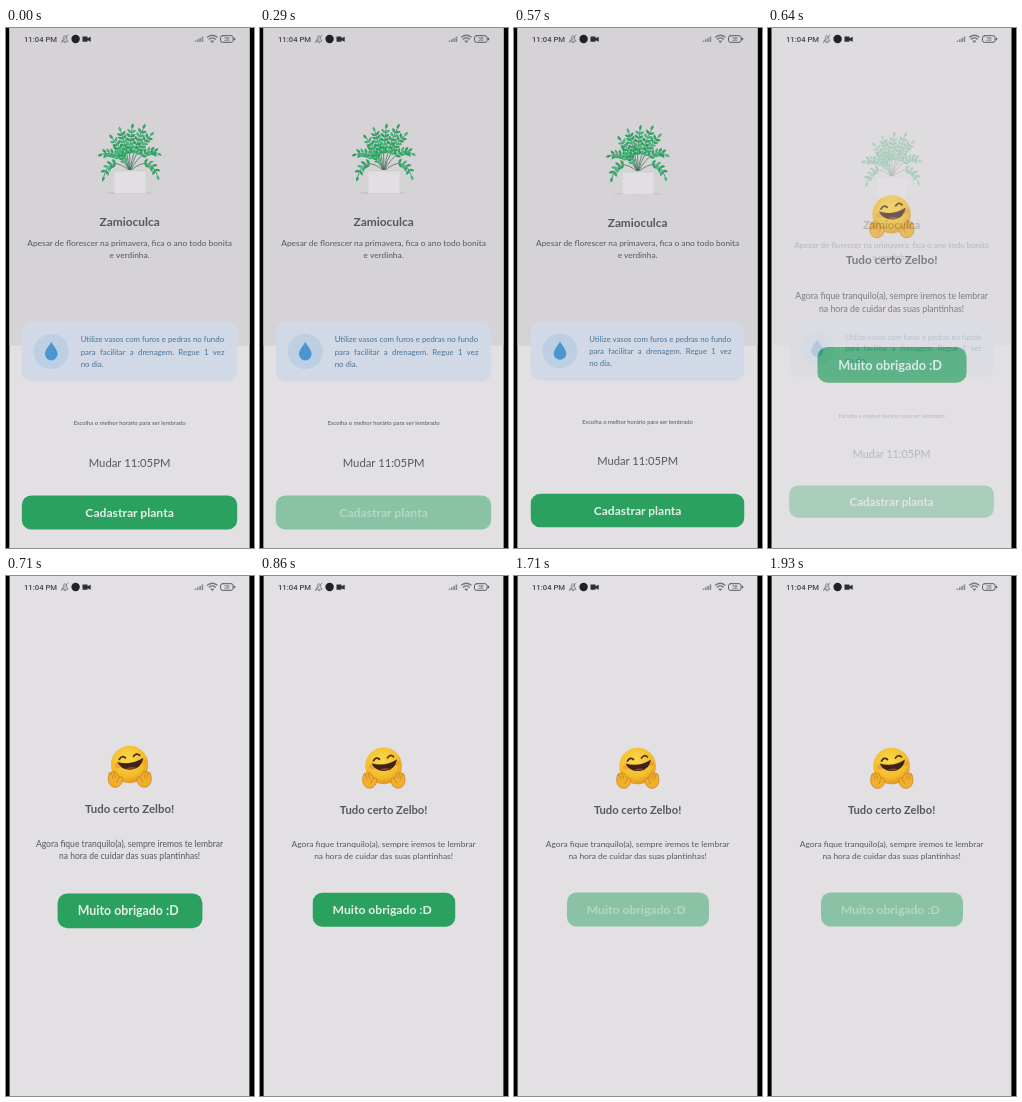
An HTML page for the animation above (2 s loop, 248 by 520 pixels).

```html
<!DOCTYPE html>
<html lang="pt-BR">
<head>
<meta charset="utf-8">
<title>Lembrete de planta</title>
<style>
  html, body { margin: 0; width: 100%; height: 100%; overflow: hidden; background: #000; }
  svg { display: block; width: 248px; height: 520px; }
  text { font-family: Lato, "Open Sans", sans-serif; fill: #55595d; }
  .mid { text-anchor: middle; }
  .bold { font-weight: 700; }
  .body { font-size: 8.4px; }
  .tip { font-size: 7.85px; fill: #4c7398; }
  .label { font-size: 12.15px; fill: #e6eee9; }
  .clock { font: 500 7.7px Roboto, sans-serif; fill: #454548; }
  .btn { fill: #2ba160; }
</style>
</head>
<body>
<svg viewBox="0 0 248 520">
  <defs>
    <radialGradient id="skin" cx=".45" cy=".35" r=".7">
      <stop offset="0" stop-color="#fbd94a"/>
      <stop offset=".65" stop-color="#f3bd2c"/>
      <stop offset="1" stop-color="#dc8f22"/>
    </radialGradient>
    <g id="hand" fill="#f0b02c" stroke="#c9791f" stroke-width=".7" stroke-linecap="round">
      <path d="M-6 -5 C-8 -1 -7 6 -2 7.5 C3 9 7 5 7 0 C7 -3 5 -3.5 4 -1.5 L1 -7 Q-.5 -8.5 -1.5 -7 Q-3 -9 -4 -6.8 Q-6 -7.5 -6 -5Z"/>
      <path d="M-4 -6.4 L-2.4 -1 M-1.5 -6.8 L.2 -1.6 M4 -1.5 Q1.5 .5 1.6 3" fill="none"/>
    </g>
  </defs>
  <rect width="248" height="520"/>
  <rect x="3.6" width="239.8" height="520" fill="#e2e0e3"/>

  <g id="done">
    <g id="face">
      <circle cx="123.6" cy="190" r="18.3" fill="url(#skin)"/>
      <ellipse cx="112.5" cy="191" rx="3.5" ry="2.6" fill="#ee8c32" opacity=".55"/>
      <ellipse cx="137" cy="187.5" rx="3.3" ry="2.6" fill="#ee8c32" opacity=".55"/>
      <g fill="none" stroke="#4a2c16" stroke-width="1.7" stroke-linecap="round">
        <path d="M113.5 185 Q116 180.5 119.5 183.5"/>
        <path d="M127.5 182 Q130.5 178 133.5 181"/>
      </g>
      <path d="M111.5 187.5 Q125 191.5 137 183.5 Q135.5 193.5 126 195 Q115.5 196 111.5 187.5Z" fill="#3f2414"/>
      <path d="M120 193.8 Q125 191.8 130 193 Q125 195.6 120 193.8Z" fill="#93432c"/>
      <use href="#hand" x="109.6" y="204.5"/>
      <use href="#hand" transform="translate(138 204.5) scale(-1 1)"/>
    </g>
    <text class="mid bold" x="123.6" y="237.6" font-size="11.2">Tudo certo Zelbo!</text>
    <text class="mid body" x="123.6" y="270.5">Agora fique tranquilo(a), sempre iremos te lembrar</text>
    <text class="mid body" x="123.6" y="283">na hora de cuidar das suas plantinhas!</text>
    <g id="thanks">
      <rect class="btn" x="53" y="316.5" width="142" height="34" rx="9.5"/>
      <text class="mid bold label" x="122.2" y="338">Muito obrigado :D</text>
    </g>
  </g>

  <g id="plant">
    <rect x="3.6" width="239.8" height="520" fill="#e2e0e3"/>
    <rect x="3.6" width="239.8" height="317.5" fill="#d5d3d6"/>
    <g id="content">
      <ellipse cx="123" cy="165" rx="24" ry="1" fill="#c3c1c4"/>
      <g id="leaves"></g>
      <rect x="108.5" y="142.5" width="31" height="23" fill="#e1dfe2"/>
      <rect x="108.5" y="142" width="31" height="1.4" fill="#d0ced1"/>
      <text class="mid bold" x="123.6" y="198" font-size="11.9">Zamioculca</text>
      <text class="mid body" x="123.6" y="217.5">Apesar de florescer na primavera, fica o ano todo bonita</text>
      <text class="mid body" x="123.6" y="230">e verdinha.</text>

      <rect x="15.8" y="293.5" width="215.4" height="60" rx="10" fill="#d0d9e5"/>
      <circle cx="45.2" cy="323.5" r="17.6" fill="#bdd0e3"/>
      <path d="M45.3 314 C47.6 317.8 51.6 322 51.6 326.1 A6.3 6.3 0 0 1 39 326.1 C39 322 43 317.8 45.3 314Z" fill="#4b95d1"/>
      <text class="tip" x="74.7" y="314">Utilize vasos com furos e pedras no fundo</text>
      <text class="tip" x="74.7" y="326.5" word-spacing="2.35">para facilitar a drenagem. Regue 1 vez</text>
      <text class="tip" x="74.7" y="338.5">no dia.</text>

      <text class="mid" x="123.6" y="396.7" font-size="5.9">Escolha o melhor horário para ser lembrado</text>
      <text class="mid" x="123.6" y="438.7" font-size="11.3">Mudar 11:05PM</text>
      <g id="save">
        <rect class="btn" x="15.8" y="467.5" width="215.4" height="34" rx="9.5"/>
        <text class="mid bold label" x="123.6" y="489">Cadastrar planta</text>
      </g>
    </g>
  </g>

  <g id="status">
    <text class="clock" x="18" y="14">11:04 PM</text>
    <g fill="none" stroke="#77767a" stroke-width=".8" stroke-linecap="round">
      <path d="M56 13 Q57.5 12 57.5 9.8 Q57.5 7.7 59 7.7 Q60.5 7.7 60.5 9.8 Q60.5 12 61.8 13Z M58.2 14.6 H59.9 M62 7 L55.3 14.8"/>
      <path d="M201.6 9 Q206.3 5.4 211 9 M203.3 11.1 Q206.3 8.7 209.3 11.1 M205.3 13 L206.3 14 L207.3 13" stroke-width="1.4"/>
      <rect x="214.5" y="7.7" width="12.6" height="6.6" rx="2" stroke="#5c5b5f" stroke-width="1"/>
    </g>
    <circle cx="69.6" cy="11" r="4.2" fill="#222225"/>
    <path d="M76.5 8.5 h5 v1.7 l3.2 -1.5 v5 l-3.2 -1.5 v1.6 h-5Z" fill="#2f2f32"/>
    <path d="M189.5 14 v-1.5 M191.8 14 v-2.8 M194.1 14 v-4.1 M196.4 14 v-5.4" stroke="#88878b" stroke-width="1.6"/>
    <rect x="227.8" y="9.7" width="1.3" height="2.6" rx=".5" fill="#5c5b5f"/>
    <text class="mid" x="220.8" y="12.9" font-size="5">38</text>
  </g>
</svg>

<script>
const LOOP = 2000;
const $ = id => document.getElementById(id);

const ticks = [0, 70, 140, 210, 290, 360, 430, 500, 570, 640, 710, 790, 860, 930, 1000, 1710];

// [time, value] tracks, linear between points.
const tracks = {
  save: [[0, 1], [70, .8], [140, .6], [210, .48], [290, .48], [360, .55], [430, .72], [500, .9], [570, 1]],
  shrink: [[500, 1], [570, .991], [640, .95], [710, .92]],
  fade: [[570, 1], [640, .3], [710, 0]],
  grow: [[640, 1.05], [710, 1.02], [790, 1.008], [860, 1.003], [1000, 1]],
  thanks: [[1709, 1], [1710, .48]]
};

function at(track, t) {
  const i = track.findIndex(p => p[0] > t);
  if (i < 0) return track[track.length - 1][1];
  if (i === 0) return track[0][1];
  const [t0, a] = track[i - 1], [t1, b] = track[i];
  return a + (b - a) * (t - t0) / (t1 - t0);
}

function zoom(el, k) {
  el.setAttribute("transform", `translate(123.6 265) scale(${k}) translate(-123.6 -265)`);
}

// Box and label fade separately, so the label dims over the box.
function dim(el, alpha) {
  for (const part of el.children) part.setAttribute("opacity", alpha);
}

function growLeaves() {
  // Stems: tip x, tip y, bend x, bend y.
  const stems = [
    [97, 126, 112, 121], [98, 148, 104, 126], [107, 111, 118, 124], [115, 104, 121, 122],
    [126, 101, 122, 122], [137, 101, 127, 121], [144, 108, 130, 121], [151, 125, 138, 118],
    [151, 147, 144, 126], [111, 122, 120, 132]
  ];
  const x0 = 124, y0 = 143;
  let lines = "", leaves = "";
  stems.forEach(([x, y, bx, by], n) => {
    lines += `M${x0} ${y0}Q${bx} ${by} ${x} ${y}`;
    const steps = Math.round(Math.hypot(x - x0, y - y0) / 6.8);
    for (let i = 0; i <= steps; i++) {
      const u = .42 + .58 * i / steps, v = 1 - u;
      const px = v * v * x0 + 2 * u * v * bx + u * u * x;
      const py = v * v * y0 + 2 * u * v * by + u * u * y;
      const dir = Math.atan2(v * (by - y0) + u * (y - by), v * (bx - x0) + u * (x - bx)) * 180 / Math.PI;
      for (const side of i === steps ? [0] : [-52, 52]) {
        const color = (i + n) % 3 ? "#2da362" : "#43b579";
        leaves += `<path d="M0 0Q2.6 -2.9 5.8 0Q2.6 2.5 0 0" fill="${color}" transform="translate(${px} ${py}) rotate(${dir + side})"/>`;
      }
    }
  });
  $("leaves").innerHTML = `<path d="${lines}" fill="none" stroke="#33684c" stroke-width=".7"/>${leaves}`;
}

function draw(now) {
  const time = now % LOOP;
  const t = ticks.filter(s => s <= time).pop();
  zoom($("content"), at(tracks.shrink, t));
  zoom($("done"), at(tracks.grow, t));
  $("plant").setAttribute("opacity", at(tracks.fade, t));
  $("done").setAttribute("visibility", t < 640 ? "hidden" : "visible");
  dim($("save"), at(tracks.save, t));
  dim($("thanks"), at(tracks.thanks, t));
}

growLeaves();
draw(0);
const start = performance.now();
(function loop() {
  draw(performance.now() - start);
  requestAnimationFrame(loop);
})();
</script>
</body>
</html>
```
